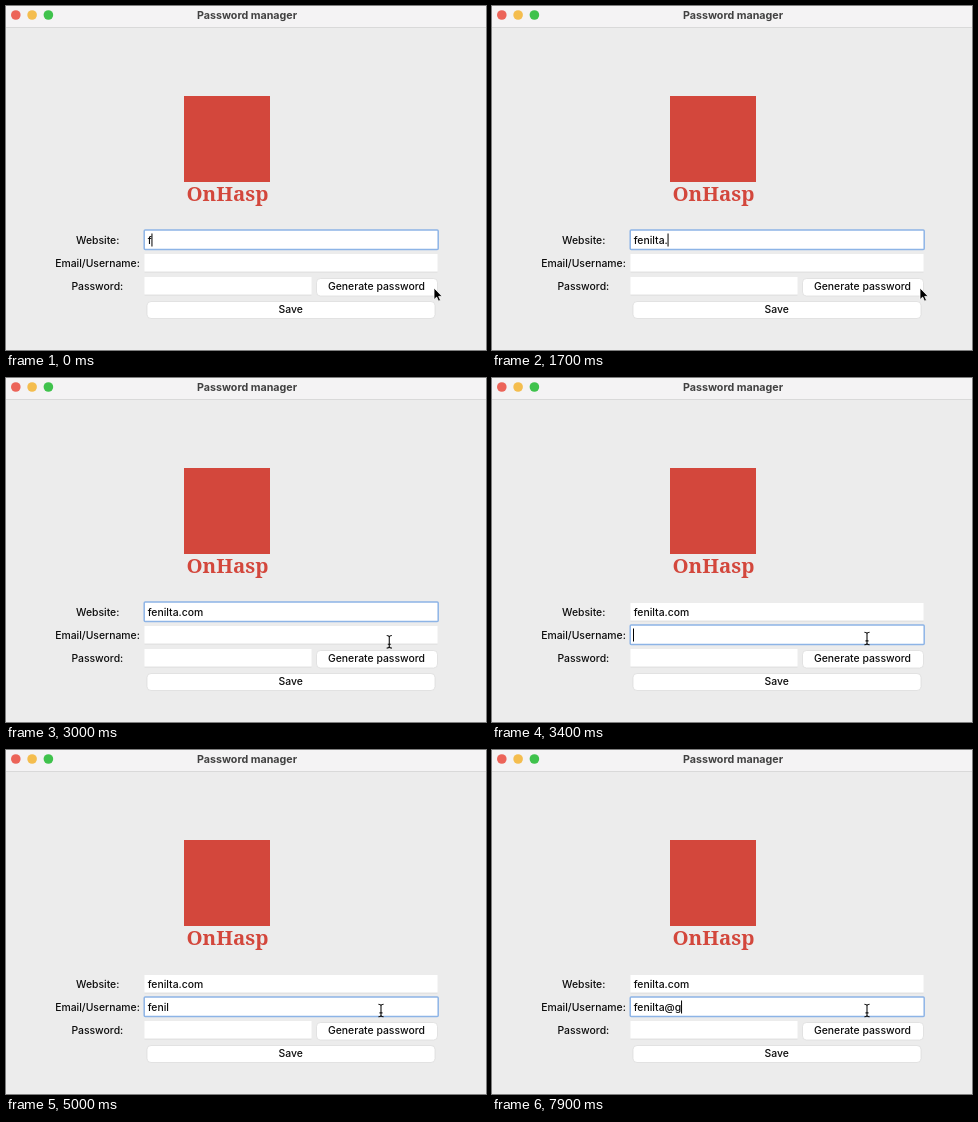
Recreate the animation shown at these times as an HTML page. Size 480 by 344 pixels, loop 8 s.

```html
<!DOCTYPE html>
<html lang="en">
<head>
<meta charset="utf-8">
<title>Password manager</title>
<style>
  html, body { margin: 0; width: 100%; height: 100%; overflow: hidden; background: #ececec; }
  svg { display: block; width: 480px; height: 344px; }
  text { font: 500 10.4px Inter, "Open Sans", sans-serif; fill: #0c0c0c; white-space: pre; }
  .title { font-size: 10.7px; font-weight: 700; fill: #414141; }
  .brand { font: 900 20.5px "Noto Serif", "DejaVu Serif", serif; fill: #d3473c; }
  .mid { text-anchor: middle; }
  .field { fill: #fff; }
  .edge { fill: #dcdcdc; }
  .button { fill: #fff; stroke: #dadada; stroke-width: .7; }
  .ring { fill: #fff; stroke: #8db4e6; stroke-width: 1.5; }
</style>
</head>
<body>
<svg viewBox="0 0 480 344">
  <rect width="480" height="344" fill="#ececec"/>
  <rect width="480" height="21" fill="#f4f3f4"/>
  <rect y="21" width="480" height="1" fill="#d9d9d9"/>
  <circle cx="9.8" cy="9" r="4.8" fill="#ec6459"/>
  <circle cx="26.1" cy="9" r="4.8" fill="#f4bd4e"/>
  <circle cx="42.4" cy="9" r="4.8" fill="#3fc24c"/>
  <text class="title mid" x="241" y="12.7">Password manager</text>

  <rect x="178" y="90" width="86" height="86" fill="#d3473c"/>
  <text class="brand mid" x="221.5" y="194.5">OnHasp</text>

  <text class="mid" x="91.7" y="238">Website:</text>
  <text class="mid" x="91.5" y="261">Email/Username:</text>
  <text class="mid" x="91.3" y="284">Password:</text>

  <g id="fields"></g>
  <rect class="edge" x="138.5" y="288.5" width="167" height="1"/>
  <rect class="field" x="138.5" y="271" width="167" height="17.5"/>

  <rect class="button" x="310.5" y="272.5" width="121" height="17.5" rx="4"/>
  <text class="mid" x="370.5" y="284">Generate password</text>
  <rect class="button" x="141" y="295.5" width="288" height="17" rx="4"/>
  <text class="mid" x="284.7" y="307">Save</text>

  <path id="arrow" d="M0 0V11.6L2.7 9.1L4.5 13.2L6.5 12.3L4.7 8.4H8.2Z" fill="#000" stroke="#fff" stroke-width=".8"/>
  <path id="beam" d="M-2.6 -6.3Q-.3 -6.3 0 -4.8Q.3 -6.3 2.6 -6.3M0 -4.8V4.8M-2.6 6.3Q-.3 6.3 0 4.8Q.3 6.3 2.6 6.3M-1.5 2.4H1.5" fill="none" stroke="#111" stroke-width="1.1"/>
</svg>
<script>
const LOOP = 8000, STEP = 100, FOCUS_SWITCH = 3300;
const MOVE = { start: 2700, end: 3100, from: [428, 282], to: [375, 260.5] };
const SVG = 'http://www.w3.org/2000/svg';
const byId = id => document.getElementById(id);

function add(parent, tag, attrs) {
  const node = document.createElementNS(SVG, tag);
  for (const key in attrs) node.setAttribute(key, attrs[key]);
  return parent.appendChild(node);
}

function show(node, visible) {
  node.setAttribute('visibility', visible ? 'visible' : 'hidden');
}

// Each key time is the moment the matching character appears.
function makeField(y, content, keys, blinkStart) {
  const g = add(byId('fields'), 'g', { transform: `translate(0 ${y})` });
  add(g, 'rect', { class: 'edge', x: 138.5, y: 17.5, width: 293, height: 1 });
  add(g, 'rect', { class: 'field', x: 138.5, y: 0, width: 293, height: 17.5 });
  const ring = add(g, 'rect', { class: 'ring', x: 138.2, y: -1, width: 294, height: 19.4, rx: 1 });
  const label = add(g, 'text', { x: 141.7, y: 12.8 });
  const caret = add(g, 'rect', { y: 2.5, width: 1, height: 13, fill: '#000' });

  return (t, focused) => {
    label.textContent = content.slice(0, keys.filter(k => k <= t).length);
    show(ring, focused);
    const phase = (t - blinkStart + 9000) % 900;
    show(caret, focused && phase < 600);
    const width = label.textContent ? label.getComputedTextLength() : -.5;
    caret.setAttribute('x', 141.5 + width);
  };
}

const website = makeField(225, 'fenilta.com',
  [0, 200, 400, 500, 700, 900, 1200, 1600, 1800, 2000, 2200], 550);
const email = makeField(248, 'fenilta@g',
  [3900, 4100, 4300, 4500, 4800, 5300, 5600, 7000, 7600], FOCUS_SWITCH);

function drawPointer(t) {
  const p = Math.min(1, Math.max(0, (t - MOVE.start) / (MOVE.end - MOVE.start)));
  const eased = p * p * (3 - 2 * p);
  const [x, y] = MOVE.from.map((v, i) => v + (MOVE.to[i] - v) * eased);
  const overField = y < 267;
  for (const [id, visible] of [['arrow', !overField], ['beam', overField]]) {
    byId(id).setAttribute('transform', `translate(${x} ${y})`);
    show(byId(id), visible);
  }
}

function render(t) {
  const inEmail = t >= FOCUS_SWITCH;
  website(t, !inEmail);
  email(t, inEmail);
  drawPointer(t);
}

const origin = performance.now();
function tick() {
  const elapsed = (performance.now() - origin) % LOOP;
  render(Math.floor(elapsed / STEP) * STEP);
  requestAnimationFrame(tick);
}
tick();
</script>
</body>
</html>
```
